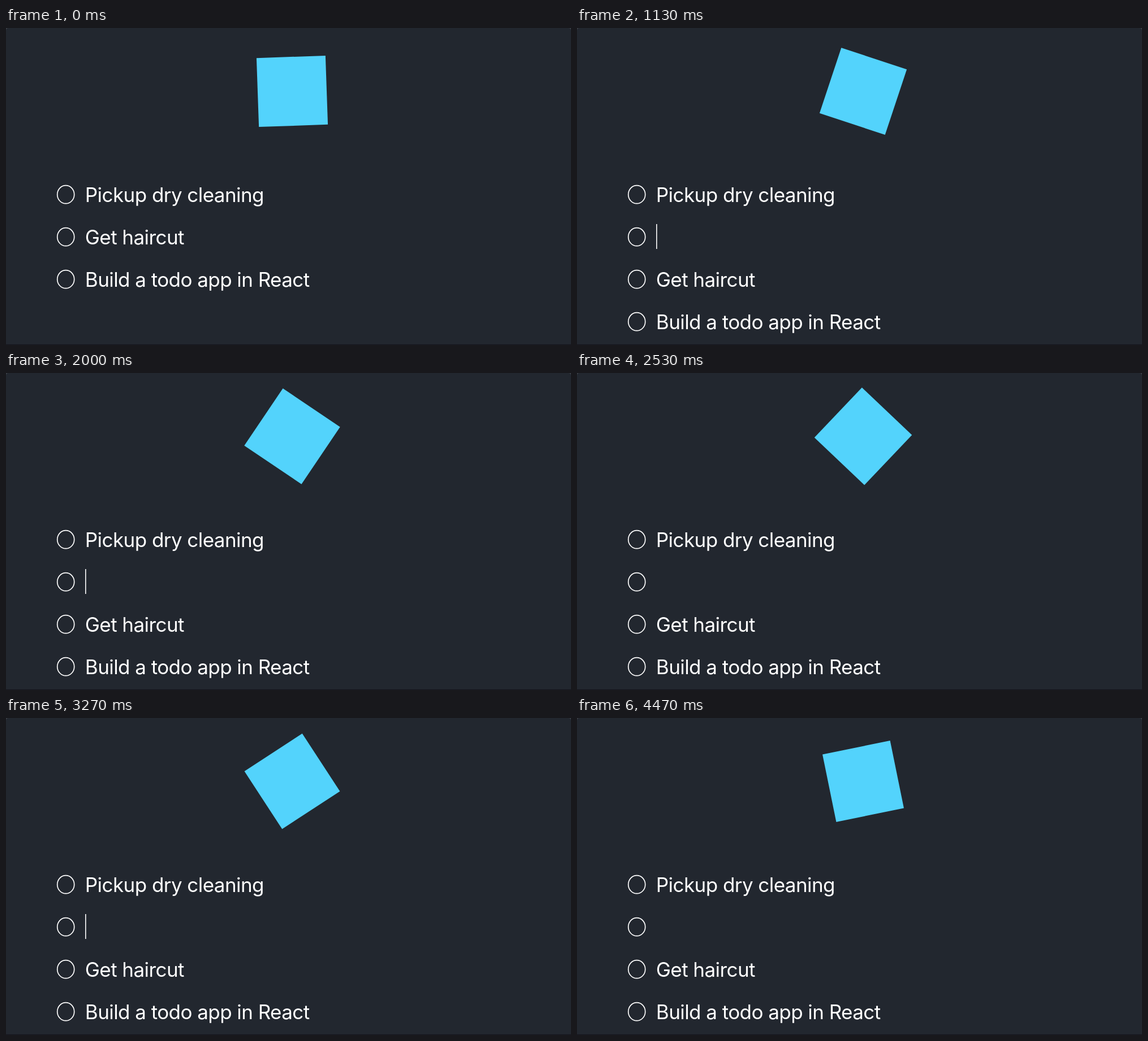
Animation of 999x561 px, one loop 4.54 s. Source, as an HTML page:

```html
<!DOCTYPE html>
<html lang="en">
<head>
<meta charset="utf-8">
<title>Todo list</title>
<style>
  html, body { margin: 0; width: 100%; height: 100%; overflow: hidden; background: #3d4148; }
  svg { display: block; width: 999px; height: 561px; }
  text { font: 400 35px Inter, "Open Sans", sans-serif; letter-spacing: -0.016em; fill: #fff; }
  ellipse { fill: none; stroke: #fff; stroke-width: 1.7; }
</style>
</head>
<body>
<svg viewBox="0 0 999 561">
  <path d="M0 561V5Q0 0 5 0H994Q999 0 999 5V561Z" fill="#22272f"/>
  <rect y="560" width="999" height="1" fill="#14121a"/>
  <rect id="badge" x="-61" y="-61" width="122" height="122" fill="#53d3fc"/>
  <g id="list"></g>
  <rect id="caret" x="140" y="347" width="1.6" height="44" fill="#fff"/>
</svg>
<script>
const LOOP = 4540;
const INSERT_AT = 870;      // ms when the empty item is added
const BLINK = 500;          // ms per caret phase
const SPIN = 360 / 20000;   // degrees per ms
const ROW = 75;

const before = ["Pickup dry cleaning", "Get haircut", "Build a todo app in React"];
const after = [before[0], "", ...before.slice(1)];
const badge = document.getElementById("badge");
const list = document.getElementById("list");
const caret = document.getElementById("caret");
let shown;

function showItems(items) {
  if (items === shown) return;
  shown = items;
  list.innerHTML = items.map((label, i) => `
    <g transform="translate(0 ${i * ROW})">
      <ellipse cx="105.7" cy="294.7" rx="15" ry="16"/>
      <text x="139.8" y="308">${label}</text>
    </g>`).join("");
}

function draw(now) {
  const t = now % LOOP;
  const sinceInsert = t - INSERT_AT;
  const inserted = sinceInsert >= 0;
  showItems(inserted ? after : before);
  const caretOn = inserted && Math.floor(sinceInsert / BLINK) % 2 === 0;
  caret.setAttribute("visibility", caretOn ? "visible" : "hidden");
  badge.setAttribute("transform", `translate(506 112) rotate(${t * SPIN - 2})`);
  requestAnimationFrame(draw);
}
draw(performance.now());
</script>
</body>
</html>
```
